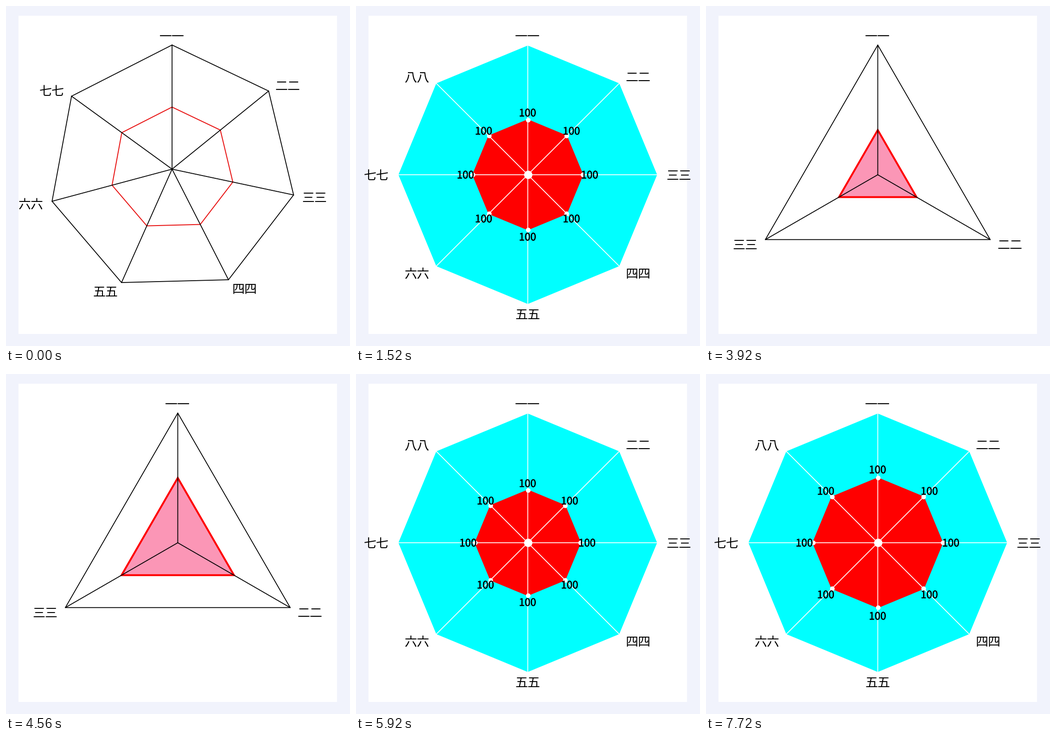
A matplotlib script that plays this animation: 742 px wide and 734 px high, repeating every 7800 ms.

```python
import numpy as np
import matplotlib.pyplot as plt
from matplotlib.animation import FuncAnimation
from matplotlib.patches import Polygon, Rectangle
from matplotlib.patheffects import withStroke

W, H, DPI = 742, 734, 100
PX = 72 / DPI
STEP, LOOP = 40, 7800
DIGITS = "一二三四五六七八"

fig = plt.figure(figsize=(W / DPI, H / DPI), dpi=DPI, facecolor="#f1f3fc")
ax = fig.add_axes([0, 0, 1, 1])
ax.set_xlim(0, W)
ax.set_ylim(H, 0)
ax.axis("off")
ax.add_patch(Rectangle((26.5, 20.5), 687.5, 687.5, color="white", lw=0, zorder=0))


def ease(x):
    """Cubic Bezier timing curve (.25, .1, .25, 1)."""
    s = np.linspace(0, 1, 400)
    a, b, c = 3 * s * (1 - s) ** 2, 3 * s**2 * (1 - s), s**3
    return float(np.interp(x, 0.25 * a + 0.25 * b + c, 0.1 * a + b + c))


def write(x, y, text, size, bold=0):
    label = ax.text(x, y, text, fontsize=size * PX, ha="center", va="baseline",
                    family="Noto Sans CJK JP", color="black", zorder=6)
    if bold:
        label.set_path_effects([withStroke(linewidth=bold * PX, foreground="black")])
    return label


class Radar:
    def __init__(self, sides, center, radius, line, fill, value_line, value_fill,
                 value_width, marked=False):
        angles = np.radians(360 // sides * np.arange(sides))
        self.dirs = np.column_stack([np.sin(angles), -np.cos(angles)])
        self.center = np.array(center)
        self.radius = radius
        self.parts, self.values = [], []
        rim = self.ring(radius)

        self.polygon(rim, fill, line, 1.8, 1)
        self.area = self.polygon(rim, value_fill, value_line, value_width, 2)
        for point in rim:
            xs, ys = zip(self.center, point)
            self.parts += ax.plot(xs, ys, color=line, lw=1.8 * PX, snap=False, zorder=3)
        sides_of = np.sign(np.round(self.dirs[:, 0], 3))
        for (x, y), side, digit in zip(self.ring(radius + 20), sides_of, DIGITS):
            self.parts.append(write(x + 26 * side - 0.4, y + 10.4, digit * 2, 27))

        self.dots = None
        if marked:
            self.dots = self.dot(rim, 10, 4)
            self.dot(self.center[None], 18, 7)
            self.values = [write(0, 0, "100", 22.3, bold=0.6) for _ in angles]
            self.parts += self.values

    def ring(self, r):
        return self.center + r * self.dirs

    def polygon(self, points, fill, line, width, z):
        patch = ax.add_patch(Polygon(points, closed=True, fc=fill, ec=line, snap=False,
                                     lw=width * PX, joinstyle="miter", zorder=z))
        self.parts.append(patch)
        return patch

    def dot(self, points, size, z):
        dots, = ax.plot(*points.T, "o", color="white", ms=size * PX, mew=0,
                        snap=False, zorder=z)
        self.parts.append(dots)
        return dots

    def show(self, on):
        for part in self.parts:
            part.set_visible(on)

    def grow(self, p):
        points = self.ring(self.radius / 2 * p)
        self.area.set_xy(points)
        self.area.set_visible(p > 0.004)
        if self.dots:
            self.dots.set_data(*points.T)
        for text, (x, y) in zip(self.values, self.ring((self.radius / 2 + 18) * p)):
            text.set_position((x - 0.5, y + 8))


MID = (370.5, 364.3)
seven = Radar(7, (358.2, 352.2), 268, "black", "none", "#e81414", "none", 2)
eight = Radar(8, MID, 280, "white", "cyan", "red", "red", 2, marked=True)
three = Radar(3, MID, 280, "black", "none", "red", "#fb96b6", 4)
charts = [seven, eight, three]

# Start time of each growth, in ms
SCENES = [(-2000, seven), (30, seven), (970, eight), (3515, three), (5410, eight)]


def draw(i):
    t = i * STEP
    start, chart = [s for s in SCENES if s[0] <= t + STEP / 2][-1]
    for c in charts:
        c.show(c is chart)
    chart.grow(ease(np.clip((t - start) / 1000, 0, 1)))
    return chart.parts


anim = FuncAnimation(fig, draw, frames=LOOP // STEP, interval=STEP,
                     repeat=True, repeat_delay=0, blit=False)
plt.show()
```
